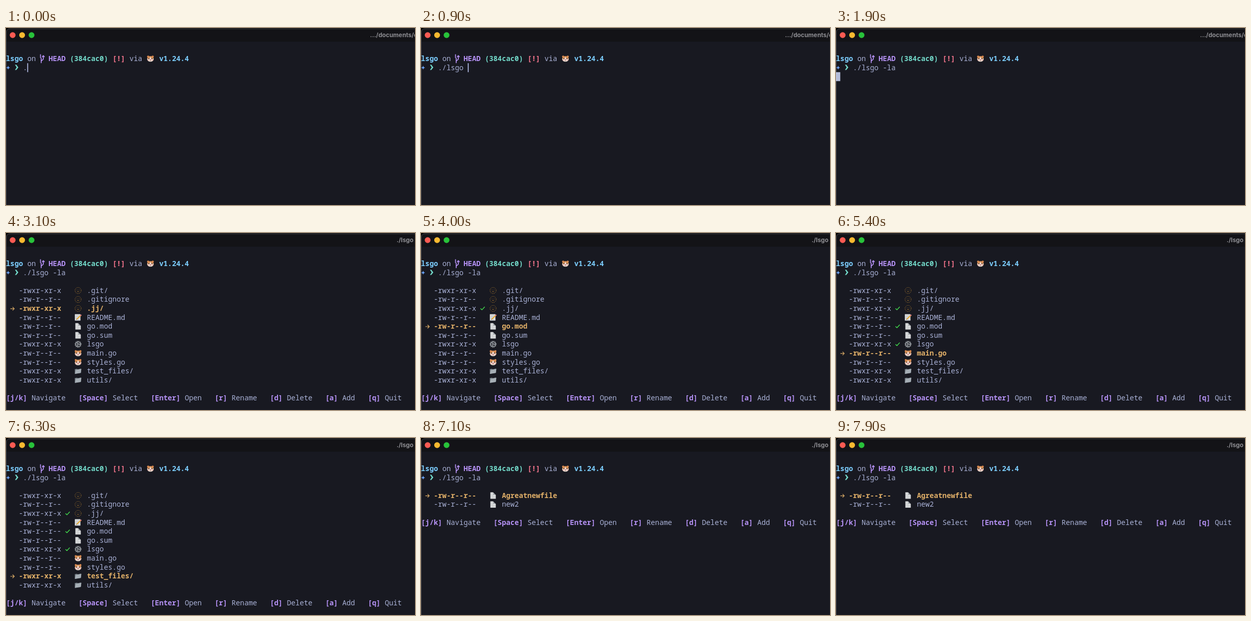
Animation, 800 px wide and 348 px high, one loop 8000 ms. Source, as an HTML page:

```html
<!DOCTYPE html>
<html lang="en">
<head>
<meta charset="utf-8">
<title>lsgo demo</title>
<style>
html, body { margin: 0; width: 100%; height: 100%; overflow: hidden; background: #000; }
svg { display: block; width: 800px; height: 348px; }
text { font: 500 13.875px "Noto Sans Mono", "DejaVu Sans Mono", monospace; white-space: pre; }
.b { font-weight: 700; }
.title { font: 700 11.8px Inter, "Open Sans", sans-serif; }
.line { fill: none; stroke-linecap: round; stroke-linejoin: round; }
</style>
</head>
<body>
<svg viewBox="0 0 800 348">
  <defs>
    <g id="hidden">
      <circle r="6" fill="none" stroke="#a4762f" stroke-width="1" stroke-dasharray="1.57 1.57"/>
      <path d="M-2-1.3v.2M2-1.3v.2M-1.6 2h3.2" class="line" stroke="#8a642c" stroke-width="1"/>
    </g>
    <g id="memo">
      <path d="M-6.3-6.3H4.6V6.3H-6.3z" fill="#e3e5e6"/>
      <path d="M-4.5-3.8h7M-4.5-1.3h5M-4.5 1.2h3M-4.5 4h7" class="line" stroke="#a2a6aa" stroke-width=".8"/>
      <path d="M-2.3 3.3L5.2-3.8" class="line" stroke="#e5a936" stroke-width="2.2"/>
      <path d="M5-3.6L5.8-4.4" class="line" stroke="#d9737b" stroke-width="2.2"/>
      <path d="M-3.6 4.6l.5-1.6 1.2 1.1z" fill="#45403c"/>
    </g>
    <g id="page">
      <path d="M-5.3-6.3H0L5.3-1V6.3H-5.3z" fill="#dcdedf"/>
      <path d="M0-6.3L5.3-1Q2-2.2.4-1 1.2-3.5 0-6.3z" fill="#8f949a"/>
      <path d="M-3.6-3.3H-1M-3.6-.8H-.6M-3.6 1.7H3.5M-3.6 4.1H3.5" class="line" stroke="#b9bcbf" stroke-width=".7"/>
    </g>
    <g id="gear" fill="none" stroke="#a0a5aa">
      <circle r="6" stroke-width="1.4" stroke-dasharray="1.57 1.57"/>
      <circle r="4.7" stroke-width="1.6"/>
      <circle r="1.7" stroke-width="1.3"/>
      <path d="M1.7 0H4.5M-.8 1.4L-2.3 4M-.8-1.4L-2.3-4" stroke-width="1.2"/>
    </g>
    <g id="hamster">
      <circle cx="-4.5" cy="-4" r="2.1" fill="#d5874f"/>
      <circle cx="4.5" cy="-4" r="2.1" fill="#d5874f"/>
      <ellipse cy=".8" rx="6.4" ry="5.2" fill="#eee0d4"/>
      <path d="M-6.2-.4Q-5-5 0-5T6.2-.4L3.4 1.4 1-1.6 0-4-1-1.6-3.4 1.4z" fill="#d98f55"/>
      <circle cx="-3" cy="0" r="1" fill="#33272a"/>
      <circle cx="3" cy="0" r="1" fill="#33272a"/>
      <circle cx="-4.5" cy="2.8" r="1.2" fill="#efaca6"/>
      <circle cx="4.5" cy="2.8" r="1.2" fill="#efaca6"/>
      <ellipse cy="1.8" rx="1.3" ry=".9" fill="#d35466"/>
      <path d="M-1.4 3.7Q0 4.8 1.4 3.7" class="line" stroke="#8d6058" stroke-width=".8"/>
    </g>
    <g id="folder">
      <path d="M-6.4 5.5V-3.8L-2-4.6-.8-3.6 5.8-5V3z" fill="#79828a"/>
      <path d="M-6.2 5.6L-4.6-2 6.5-4.3 5.2 3.8z" fill="#a6afb6"/>
    </g>
  </defs>
  <path d="M.5 348V9Q.5 1.5 8 1.5H800V348z" fill="#181921"/>
  <path d="M.5 27V9Q.5 1.5 8 1.5H800V27z" fill="#131317"/>
  <path d="M.5 348V9Q.5 1.5 8 1.5H800" fill="none" stroke="#45464c"/>
  <circle cx="13" cy="14" r="5.7" fill="#fb5b53"/>
  <circle cx="31.5" cy="14" r="5.7" fill="#f8b930"/>
  <circle cx="50" cy="14" r="5.7" fill="#28c23a"/>
  <g id="screen"></g>
</svg>
<script>
const CELL = 8.325, ROW = 17.6, LOOP = 8000;
const FG = '#a9b1d6', BLUE = '#7dcfff', PURPLE = '#b692f6', TEAL = '#73daca', RED = '#f7768e', GOLD = '#e0af68';
const COMMAND = './lsgo -la';
const LIST_AT = 2100, OPEN_AT = 7000;

const home = [
  ['.git/', 'hidden', 1], ['.gitignore', 'hidden'], ['.jj/', 'hidden', 1],
  ['README.md', 'memo'], ['go.mod', 'page'], ['go.sum', 'page'], ['lsgo', 'gear', 1],
  ['main.go', 'hamster'], ['styles.go', 'hamster'], ['test_files/', 'folder', 1], ['utils/', 'folder', 1]
];
const inner = [['Agreatnewfile', 'page'], ['new2', 'page']];
const moves = [2500, 2800, 3600, 3800, 4400, 4600, 5300, 5500, 5700];  // each "j" press
const checks = { 2: 3300, 4: 4200, 6: 5000 };                          // row: time of "space"
const keys = [['j/k', 'Navigate'], ['Space', 'Select'], ['Enter', 'Open'], ['r', 'Rename'],
  ['d', 'Delete'], ['a', 'Add'], ['q', 'Quit']];

const mid = row => 60.3 + ROW * row;
const text = (col, row, str, color = FG, bold = false) =>
  `<text x="${col * CELL}" y="${64.9 + ROW * row}" fill="${color}"${bold ? ' class="b"' : ''}>${str}</text>`;
const icon = (id, x, row) => `<use href="#${id}" x="${x}" y="${mid(row)}"/>`;
const line = (d, color, width, y = 0) =>
  `<path class="line" transform="translate(0 ${y})" d="${d}" stroke="${color}" stroke-width="${width}"/>`;
const cursor = (col, row, width, color) =>
  `<rect x="${col * CELL}" y="${51.6 + ROW * row}" width="${width}" height="${ROW}" fill="${color}"/>`;
const title = (x, str) => `<text class="title" x="${x}" y="18" fill="#8c8c91">${str}</text>`;

const prompt = text(0, 0, 'lsgo', BLUE, true) + text(5, 0, 'on') +
  line('M67.5-8V-2M68.8-1V8M69 4.5L73 1V-5M71-3.8L73-6 75-3.8', PURPLE, 1.7, mid(0)) +
  text(10, 0, 'HEAD', PURPLE, true) + text(15, 0, '(384cac0)', TEAL, true) +
  text(25, 0, '[!]', RED, true) + text(29, 0, 'via') +
  icon('hamster', 282.5, 0) + text(36, 0, 'v1.24.4', BLUE, true) +
  `<path transform="translate(4.2 78)" d="M0-4Q.6-.6 4 0 .6.6 0 4-.6.6-4 0-.6-.6 0-4z" fill="#6ba3f7"/>` +
  `<path transform="translate(17.5 77.4)" d="M0-5.2H2.7L6.6 0 2.7 5.2H0L3.4 0z" fill="${TEAL}"/>`;

function listing(files, selected, t) {
  let out = '';
  files.forEach(([name, pic, exec], i) => {
    const row = i + 3, on = i === selected, color = on ? GOLD : FG;
    out += text(3, row, exec ? '-rwxr-xr-x' : '-rw-r--r--', color, on) +
      icon(pic, 141, row) + text(19, row, name, color, on);
    if (on) out += line('M9 0H16M13.2-3L16.2 0 13.2 3', GOLD, 1.2, mid(row) + .5);
    if (files === home && t >= checks[i]) out += line('M116.8.5L119.2 2.8 124.3-2.8', '#43e04e', 1.4, mid(row));
  });
  let col = 0;
  for (const [key, label] of keys) {
    out += text(col, files.length + 4, `[${key}]`, PURPLE, true) +
      text(col + key.length + 3, files.length + 4, label);
    col += key.length + label.length + 6;
  }
  return out;
}

function scene(t) {
  const typed = COMMAND.slice(0, 1 + Math.floor(t / 150));
  let out = prompt + text(4, 1, typed);
  if (t < LIST_AT) {
    out += title(712, '.../documents/c');
    return out + (t < 1600 ? cursor(4 + typed.length, 1, 1.6, '#c0caf5') : cursor(0, 2, CELL, '#b5bdda'));
  }
  out += title(764, './lsgo');
  return out + (t < OPEN_AT
    ? listing(home, moves.filter(m => t >= m).length, t)
    : listing(inner, 0, t));
}

const screen = document.getElementById('screen');
let shown;
function draw(now) {
  const next = scene(now % LOOP);
  if (next !== shown) screen.innerHTML = shown = next;
  requestAnimationFrame(draw);
}
draw(performance.now());
</script>
</body>
</html>
```
